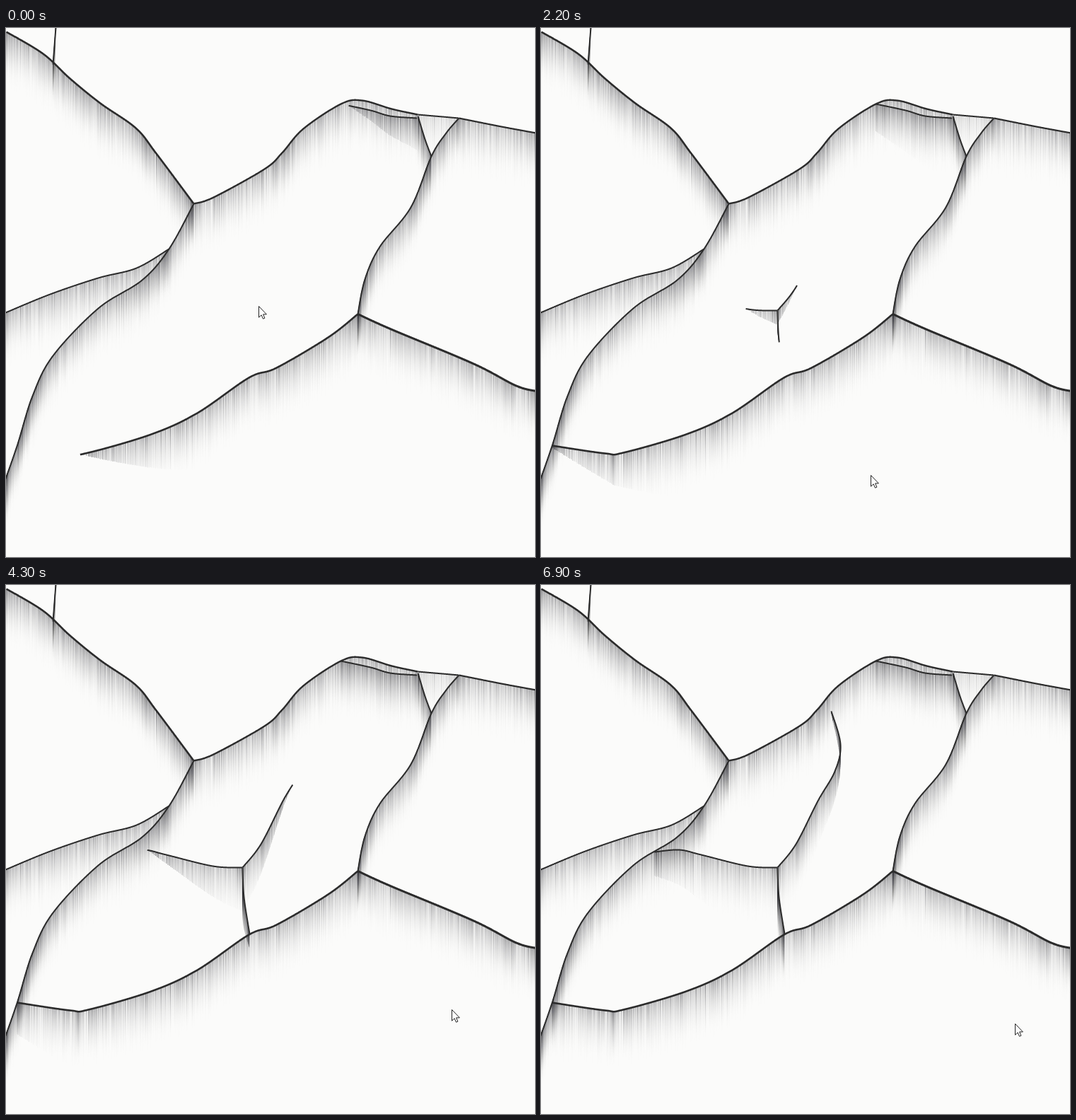
Animation of 748 by 748 pixels, one loop 7000 ms. Source, as an HTML page with a canvas:

```html
<!DOCTYPE html>
<html lang="en">
<head>
<meta charset="utf-8">
<title>Growing cracks</title>
<style>
  html, body { margin: 0; width: 100%; height: 100%; overflow: hidden; background: #fbfbfa; }
  canvas { display: block; width: 748px; height: 748px; }
</style>
</head>
<body>
<canvas id="stage" width="748" height="748"></canvas>
<script>
const SIZE = 748, LOOP = 7000, STEP = 100;
const SPEED = 44;   // crack growth, px per second
const FALL = 20;    // shadow growth, px per second
const STRIP = 110;  // height of the shadow sprite
const CLICK = 1.17; // a new triple crack starts, in seconds

const ctx = document.getElementById('stage').getContext('2d');

let seed = 71;
function random() {
  seed = (seed * 16807) % 2147483647;
  return seed / 2147483647;
}

function layer(w, h) {
  const c = document.createElement('canvas');
  c.width = w;
  c.height = h;
  return c.getContext('2d');
}

const strip = layer(1, STRIP);
for (let y = 0; y < STRIP; y++) {
  strip.fillStyle = `rgba(30,30,36,${(1 - y / STRIP) ** 3})`;
  strip.fillRect(0, y, 1, 1);
}

function spline(a, b, c, d, t) {
  return b + 0.5 * t * (c - a + t * (2 * a - 5 * b + 4 * c - d + t * (3 * (b - c) + d - a)));
}

// Walks a smooth curve in half-pixel steps, noting the arc length.
function trace(text) {
  const pts = text.split(' ').map(p => p.split(',').map(Number));
  const at = i => pts[Math.max(0, Math.min(pts.length - 1, i))];
  const out = [];
  let arc = 0, last = pts[0];
  for (let i = 0; i < pts.length - 1; i++) {
    const [a, b, c, d] = [at(i - 1), at(i), at(i + 1), at(i + 2)];
    const n = Math.ceil(2 * Math.hypot(c[0] - b[0], c[1] - b[1]));
    for (let k = 1; k <= n; k++) {
      const [x, y] = [0, 1].map(j => spline(a[j], b[j], c[j], d[j], k / n));
      arc += Math.hypot(x - last[0], y - last[1]);
      last = [x, y];
      out.push({ x, y, arc, alpha: 0.06 + 0.18 * random() ** 1.5, reach: 75 + 35 * random() });
    }
  }
  return out;
}

const fixed = [], growing = [];

function still(width, shade, text) {
  fixed.push({ width, shade, start: -100, pts: trace(text) });
}

function grow(width, shade, { start, end }, text) {
  const pts = trace(text);
  growing.push({ width, shade, pts, start: start ?? end - pts[pts.length - 1].arc / SPEED });
}

still(2.6, 1, '0,5 52,36 90,71 133,106 183,141 212,177 265,248');
still(2, 0.4, '70,-1 66,51');
still(2.4, 1, '265,248 293,239 365,199 390,176 420,142 473,107 503,102 545,114 582,122');
still(2, 0.5, '582,122 640,127');
still(2.2, 1, '640,127 700,139 749,148');
still(2, 0.9, '265,248 230,312 192,356 130,396 66,463 37,520 16,588 -1,637');
still(2, 1, '230,312 184,339 130,353 62,376 -1,402');
still(2, 0.9, '640,127 622,148 601,181 572,253 528,309 507,355 497,404');
still(2, 0.8, '582,124 592,157 601,181');
still(3, 1, '749,513 720,505 660,474 543,425 497,404');

grow(2, 1, { end: 0.25 }, '581,127 543,124 515,116 473,107');
grow(2.6, 1, { end: 2.05 }, '497,404 455,437 382,480 343,494 270,544 205,574 116,600 90,601 15,590');
grow(2, 1, { start: CLICK }, '334,399 292,397 226,381 195,374 160,377');
grow(2, 0.6, { start: CLICK }, '334,399 336,441 344,493');
grow(2, 0.8, { start: CLICK }, '334,399 360,366 391,305 415,263 423,225 410,178');

function drawShade(g, crack, time) {
  for (const p of crack.pts) {
    const age = time - crack.start - p.arc / SPEED;
    if (age <= 0) break;
    const depth = Math.round(Math.min(p.reach, age * FALL));
    if (!depth) continue;
    g.globalAlpha = p.alpha * crack.shade;
    g.drawImage(strip.canvas, 0, 0, 1, STRIP * depth / p.reach, Math.floor(p.x), Math.round(p.y), 1, depth);
  }
  g.globalAlpha = 1;
}

function drawLine(g, crack, time) {
  const tip = (time - crack.start) * SPEED;
  g.beginPath();
  for (const p of crack.pts) {
    if (p.arc > tip) break;
    g.lineTo(p.x + 0.5, p.y + 0.5);
  }
  g.lineWidth = crack.width;
  g.strokeStyle = '#2b2b2b';
  g.lineJoin = 'round';
  g.stroke();
}

const shades = layer(SIZE, SIZE), lines = layer(SIZE, SIZE);
for (const c of fixed) {
  drawShade(shades, c, 0);
  drawLine(lines, c, 0);
}

// seconds, x, y
const pointer = [
  [0, 357, 393], [1, 350, 395], [CLICK, 334, 399], [2.2, 466, 632],
  [3.7, 640, 626], [4.8, 623, 580], [5.6, 653, 607], [6.9, 670, 620]
];
const arrow = new Path2D('M.5 .5V16.2L4.1 12.8L6.5 18.2L8.9 17.2L6.6 11.9H11.4Z');

function drawPointer(time) {
  const i = Math.max(1, pointer.findIndex(p => p[0] >= time));
  const [t0, x0, y0] = pointer[i - 1], [t1, x1, y1] = pointer[i];
  const u = (time - t0) / (t1 - t0);
  const ease = u * u * (3 - 2 * u);
  ctx.save();
  ctx.translate(Math.round(x0 + (x1 - x0) * ease), Math.round(y0 + (y1 - y0) * ease));
  ctx.fillStyle = '#fff';
  ctx.fill(arrow);
  ctx.lineWidth = 1;
  ctx.strokeStyle = '#222';
  ctx.stroke(arrow);
  ctx.restore();
}

function draw(time) {
  ctx.fillStyle = '#fbfbfa';
  ctx.fillRect(0, 0, SIZE, SIZE);
  ctx.drawImage(shades.canvas, 0, 0);
  for (const c of growing) drawShade(ctx, c, time);
  ctx.drawImage(lines.canvas, 0, 0);
  for (const c of growing) drawLine(ctx, c, time);
  drawPointer(time);
}

let shown = -1;
function tick() {
  const step = Math.floor(performance.now() % LOOP / STEP);
  if (step !== shown) {
    shown = step;
    draw(step * STEP / 1000);
  }
  requestAnimationFrame(tick);
}
tick();
</script>
</body>
</html>
```
